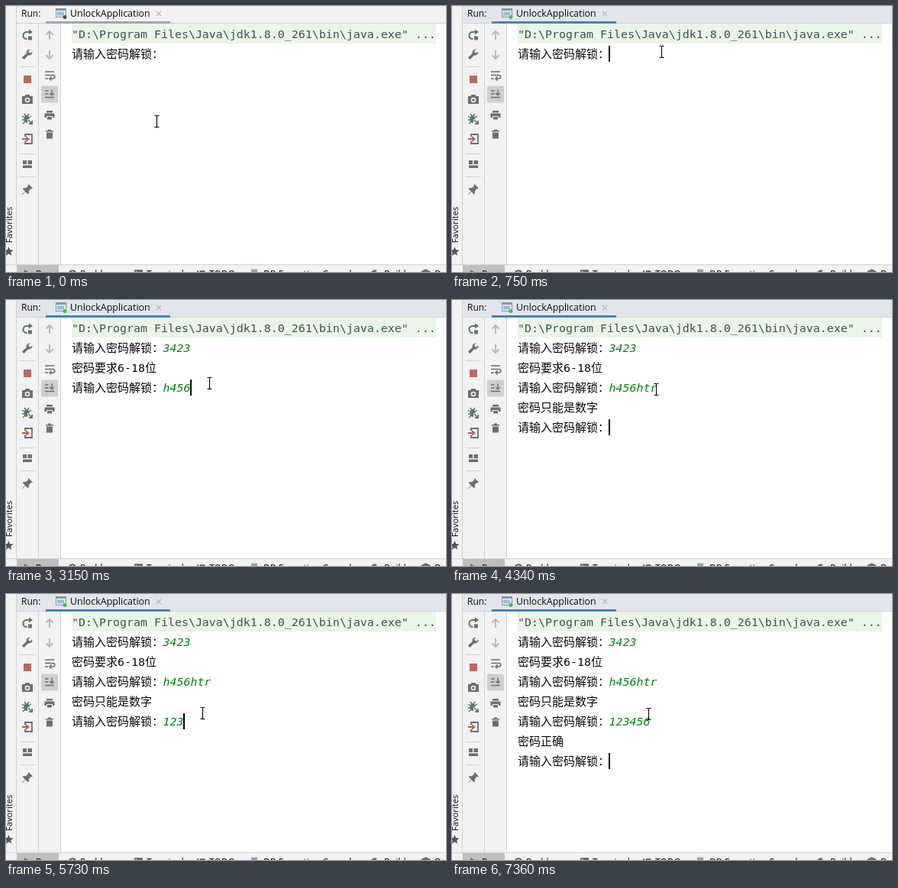
Animation of 576 by 348 pixels, one loop 8 s. Source, as an HTML page:

```html
<!DOCTYPE html>
<html lang="zh-CN">
<head>
<meta charset="utf-8">
<title>Run console</title>
<style>
  html, body { margin: 0; width: 100%; height: 100%; overflow: hidden; background: #fff; }
  svg { display: block; width: 576px; height: 348px; }
  text { white-space: pre; }
  .ui { font: 12px "Open Sans", "Noto Sans", sans-serif; fill: #0a0a0a; }
  .mono { font: 15px "Noto Sans CJK SC", "Noto Sans CJK JP", sans-serif; fill: #080808; }
  .code { font: 14.95px "DejaVu Sans Mono", "Noto Sans Mono", monospace; fill: #080808; }
  .typed { font-style: italic; fill: #00850f; }
  .line { stroke: #d1d1d1; fill: none; }
  .g { fill: #6e6e6e; }
  .s { fill: none; stroke: #6e6e6e; stroke-width: 1.8; }
  .pale { stroke: #b4b6b8; }
</style>
</head>
<body>
<svg viewBox="0 0 576 348" xmlns="http://www.w3.org/2000/svg">
  <rect width="576" height="348" fill="#f2f2f2"/>
  <rect x="72" y="23" width="504" height="315" fill="#fff"/>

  <!-- dividers -->
  <path class="line" d="M13.5 0V338M42.5 23V338M71.5 23V338M14 22.5H576M0 338.5H576M18 79.5H38M18 193.5H38M18 223.5H38"/>

  <!-- header -->
  <rect id="head" x="14" width="562" height="22"/>
  <rect id="under" x="52" y="20" width="163" height="3"/>
  <text class="ui" x="20" y="14">Run:</text>
  <text class="ui" x="84" y="14" style="font-size:12.45px">UnlockApplication</text>
  <rect x="65.5" y="3.5" width="13" height="11" fill="#dfeaf0" stroke="#8d979e"/>
  <path d="M65 3h14v3H65z" fill="#8d979e"/>
  <path d="M67 7.500h9v5h-9z" fill="#8cc4de"/>
  <circle id="dot" cx="77" cy="14.5" r="2.5"/>
  <path d="M197 7l6 6M203 7l-6 6" stroke="#b4b7ba" stroke-width="1.1"/>

  <!-- left stripe -->
  <text class="ui" transform="translate(8 310) rotate(-90)" style="font-size:11.2px">Favorites</text>
  <path fill="#555" d="M3.500 315l1.700 4 4.300.4-3.300 2.800 1 4.300-3.700-2.300-3.700 2.300 1-4.300-3.300-2.800 4.300-.4z"/>

  <!-- first toolbar -->
  <g transform="translate(28 38)">
    <path d="M-.5 5H-1a4.500 4.500 0 0 1 0-9H3" fill="none" stroke="#5b7565" stroke-width="2"/>
    <path d="M2-7.500L7-4 2-.5z" fill="#5b7565"/>
    <path class="g" d="M1 1.500h5v5H1z"/>
  </g>
  <g transform="translate(28 63)">
    <path class="g" d="M6.500-3.500 3.500-1 1-3.500 3.500-6.500A4.500 4.500 0 0 0-1.300-1L-7 4.500l2.500 2.500L1 1.400A4.500 4.500 0 0 0 6.500-3.500z"/>
  </g>
  <rect x="23" y="91" width="10" height="10" fill="#b9695f"/>
  <g transform="translate(28 122)">
    <path class="g" d="M-7-4h3.500l1-2h5l1 2H7V6H-7z"/>
    <circle cy="1" r="3.300" fill="#f2f2f2"/><circle cy="1" r="1.800" class="g"/>
  </g>
  <g transform="translate(28 148)">
    <ellipse cx="-1" rx="3.500" ry="5" fill="#59795f"/>
    <path d="M-7-4l3 2M-7 1h3M-6 6l3-3M5-4L2-2M-4-7l2 3M2-7L0-4" stroke="#59795f" stroke-width="1.400"/>
    <path d="M0 0h7v7H0z" fill="#f2f2f2"/>
    <path d="M1 1l5 5M6.200 2v4.200H2" stroke="#6e6e6e" stroke-width="1.700" fill="none"/>
  </g>
  <g transform="translate(28 174)">
    <path class="s" d="M-3-3V-6H6V6H-3V3"/>
    <path d="M-7 0H1M-2-3.200L1.500 0-2 3.200" fill="none" stroke="#bd5f55" stroke-width="1.800"/>
  </g>
  <path class="g" d="M22 202h5v5h-5zM28.500 202h5.500v5h-5.500zM22 208.500h12v3.500H22z"/>
  <g transform="translate(28 240)">
    <path class="g" d="M1.500-7L7-1.500 5.500-.8 4.500-1 1.800 2.200 2 5 .8 6.200-2.600 3-6.500 7-7 6.500-3 2.600-6.200-.8-5-2l2.800.2L1-4.500.8-5.500z"/>
  </g>

  <!-- second toolbar -->
  <rect x="46" y="104.500" width="22" height="22" rx="2" fill="#cfcfcf"/>
  <path class="s pale" d="M57 44V33M52.500 37.500L57 33l4.500 4.500M57 58v11M52.500 64.500L57 69l4.500-4.500"/>
  <path class="s" d="M51 86H63M51 90.500H61.500a2 2 0 0 1 0 4.500H57M59.500 92.500L57 95l2.500 2.500M51 95h4" style="stroke-width:1.600"/>
  <path class="s" d="M51 111h4.500M51 115h4.500M51 119.500H63M60 109.500v7M57.300 114l2.700 2.700 2.700-2.700" style="stroke-width:1.500"/>
  <path class="g" d="M53 137h8v2.500h-8zM50.500 140.500h13v5.500h-2.500v-2h-8v2h-2.500zM54 145h6v3.500h-6z"/>
  <path class="g" d="M52 163h10v1.500H52zM55 161.500h4v1.500h-4zM53 165.500h8v8h-8z"/>

  <!-- console -->
  <rect x="86" y="23" width="477" height="26" fill="#e9f5e6"/>
  <text class="code" x="86" y="42" style="fill:#3e534d">"D:\Program Files\Java\jdk1.8.0_261\bin\java.exe" ...</text>
  <g id="console"></g>
  <rect id="caret" width="2" height="21" fill="#000"/>

  <!-- bottom bar -->
  <rect x="14" y="339" width="55" height="9" fill="#bfbfbf"/>
  <g id="bar" class="ui"></g>
  <path class="g" d="M24 345l9 5h-9z"/>
  <circle class="g" cx="87" cy="350.500" r="5.500"/><path d="M87 347V349" stroke="#f2f2f2" stroke-width="1.500"/>
  <path class="g" d="M168 345h11v4h-11z"/><path d="M170 346.500l2 2" stroke="#f2f2f2"/>
  <path class="g" d="M250 346h2v2h-2zM253.500 346h7v2h-7z"/>
  <path d="M321 344.500h8v4h-8z" fill="#8aa5b3"/>
  <path class="g" d="M476 349l6-4 4 1-4 4z"/>
  <path class="g" d="M549.500 344l6 3v2h-12v-2z"/>

  <path id="mouse" d="M-3-7.500H-.8L0-6.800.8-7.500H3M0-6.800V6.800M-3 7.500H-.8L0 6.800.8 7.500H3" fill="none" stroke="#000" stroke-width="1.100"/>
</svg>
<script>
const LOOP = 8000, LEFT = 86, INPUT = 206, CHAR = 9, ROW = 26;
const $ = id => document.getElementById(id);

const make = (tag, cls, text) => {
  const el = document.createElementNS("http://www.w3.org/2000/svg", tag);
  if (cls) el.setAttribute("class", cls);
  el.textContent = text;
  return el;
};
const add = (parent, x, y, text, cls) => {
  const el = make("text", cls, text);
  el.setAttribute("x", x);
  el.setAttribute("y", y);
  return parent.appendChild(el);
};
const set = (id, attrs) => {
  for (const k in attrs) $(id).setAttribute(k, attrs[k]);
};
const latest = (list, t) => list.reduce((a, b) => b[0] <= t ? b : a);

// Chinese in the wide face, everything else in the fixed-width one
function addLine(row, text) {
  const el = add($("console"), LEFT, 42 + row * ROW, "", "mono");
  for (const part of text.match(/[ -~]+|[^ -~]+/g))
    el.append(make("tspan", /[ -~]/.test(part) ? "code" : "mono", part));
  return el;
}

const prompt = "请输入密码解锁：";
const output = [
  [0, 1, prompt],
  [2070, 2, "密码要求6-18位"], [2070, 3, prompt],
  [4340, 4, "密码只能是数字"], [4340, 5, prompt],
  [7360, 6, "密码正确"], [7360, 7, prompt]
].map(([at, row, text]) => ({ at, el: addLine(row, text) }));

// keys: [time, characters typed]
const inputs = [
  { row: 1, text: "3423", keys: [[0, 0], [980, 2], [1230, 4]] },
  { row: 3, text: "h456htr", keys: [[0, 0], [3020, 3], [3150, 4], [3320, 5], [3390, 7]] },
  { row: 5, text: "123456", keys: [[0, 0], [5560, 1], [5650, 2], [5730, 3], [5960, 4], [6280, 5], [6510, 6]] }
];
for (const i of inputs) i.el = add($("console"), INPUT - 0.5, 42 + i.row * ROW, "", "code typed");

// [time, row, at prompt]; row 0 hides the caret
const carets = [
  [0, 0], [680, 1, 1], [1690, 0], [1910, 2], [2070, 3, 1], [2700, 0], [3020, 3, 1],
  [4180, 4], [4340, 5, 1], [5280, 0], [5560, 5, 1], [7210, 6], [7360, 7, 1]
];

// [first step, last step, steps, x, y]
const moves = [
  [70, 680, 9, 274.5, 60],
  [2150, 2300, 3, 266.5, 109],
  [3710, 3710, 1, 265.5, 107],
  [3860, 3860, 1, 264.5, 111],
  [4180, 4340, 3, 267.5, 117],
  [4420, 4650, 4, 260.5, 144],
  [4960, 5030, 2, 257.5, 156],
  [6910, 6910, 1, 257.5, 157]
];

const labels = [[39, "Run"], [97, "Problems"], [184, "Terminal"], [266, "TODO"],
  [337, "DB Execution Console"], [495, "Build"], [561, "Dependencies"]];
for (const [x, text] of labels) add($("bar"), x, 354.5, text);

function mouseAt(t) {
  let x = 197.5, y = 151;
  for (const [from, to, n, tx, ty] of moves) {
    if (t < from) break;
    const gap = n > 1 ? (to - from) / (n - 1) : 1;
    const p = Math.min(n, Math.floor((t - from) / gap + 0.05) + 1) / n;
    const e = p * p * (3 - 2 * p);
    x += (tx - x) * e;
    y += (ty - y) * e;
  }
  return [Math.floor(x) + 0.5, Math.round(y)];
}

function draw(t) {
  const focus = t >= 680;
  set("head", { fill: focus ? "#e2e6ec" : "#f2f2f2" });
  set("under", { fill: focus ? "#4083c9" : "#9ca7b8" });
  set("dot", { fill: focus ? "#3fbf4a" : "#4a4f4b" });

  for (const o of output) o.el.style.display = t >= o.at ? "" : "none";
  for (const i of inputs) {
    i.count = latest(i.keys, t)[1];
    i.el.textContent = i.text.slice(0, i.count);
  }

  const [, row, atPrompt] = latest(carets, t);
  const line = inputs.find(i => i.row === row);
  set("caret", {
    x: atPrompt ? INPUT - 1 + (line ? line.count : 0) * CHAR : LEFT,
    y: ROW * (row + 1),
    visibility: row ? "visible" : "hidden"
  });
  set("mouse", { transform: `translate(${mouseAt(t)})` });
}

const start = performance.now();
function tick() {
  draw((performance.now() - start) % LOOP);
  requestAnimationFrame(tick);
}
tick();
</script>
</body>
</html>
```
